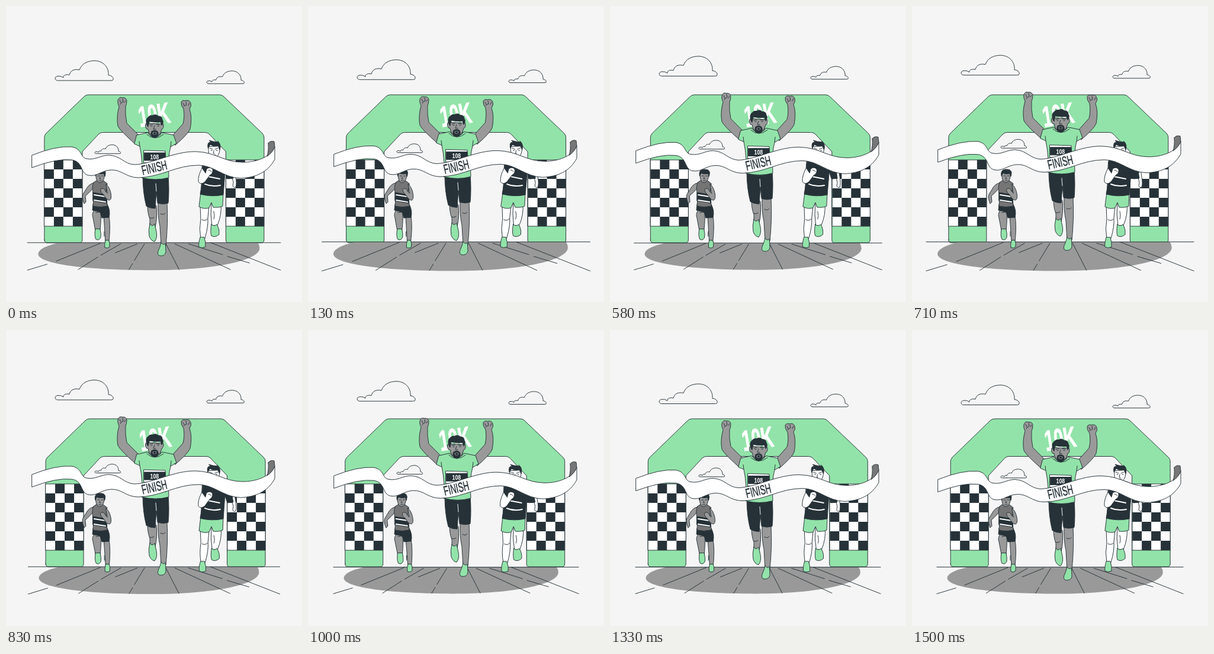
Write an HTML page that moves like this. It is 500 px wide and 500 px high and loops after 1.54 s.

```html
<!DOCTYPE html>
<html lang="en">
<head>
<meta charset="utf-8">
<title>Finish line</title>
<style>
  html, body { margin: 0; height: 100%; overflow: hidden; background: #f5f5f5; }
  svg { display: block; width: 100vw; height: 100vh; }
  svg * { vector-effect: non-scaling-stroke; }
  .ink { stroke: #263238; stroke-width: .95; stroke-linejoin: round; stroke-linecap: round; fill: none; }
  .ink .green { fill: #92e3a9; }
  .ink .dark, .dark { fill: #263238; }
  .ink .white { fill: #fff; }
  .ink .skin { fill: #999; }
  .ink .vest { fill: #757575; }
  .ink .sky { fill: #f5f5f5; }
  .stripe { stroke: #fff; stroke-width: 2; }
  text { font-family: "Liberation Sans", Arial, sans-serif; stroke: none; }
</style>
</head>
<body>
<svg viewBox="0 0 500 500">
  <defs>
    <pattern id="checks" x="65" y="260" width="32" height="32" patternUnits="userSpaceOnUse">
      <rect width="32" height="32" fill="#fff"/>
      <path class="dark" d="M16 0h16v16H0v16h16z"/>
    </pattern>
    <path id="cloud" d="M87 126C82 126 81 119 88 118.500Q93 118 97 121C96 117 102 115 107 116.500C109 109 115 106 124 108C128 97 138 92.500 150 92.500C165 93 174 104 173 117C178 117 182 121 181 124Q181 126 178 126Z"/>
  </defs>

  <g class="ink float">
    <use href="#cloud" class="sky"/>
    <use href="#cloud" class="sky" transform="translate(285.500 50) scale(.645)"/>
    <use href="#cloud" class="sky" transform="translate(113 193.300) scale(.445)"/>
  </g>

  <g id="arch" class="ink">
    <path class="green" d="M65 395V222Q65 218 68 215L132 153Q135 150 139 150H361Q365 150 368 153L433 215Q436 218 436 222V395Q436 400 431 400H376Q371.500 400 371.500 395V246L343 216Q340 213.500 336 213.500H164Q160 213.500 157 216L129 246V395Q129 400 124 400H70Q65 400 65 395Z"/>
    <path fill="url(#checks)" d="M65 260h64v112h-64z"/>
    <path fill="url(#checks)" transform="translate(307)" d="M65 260h64v112h-64z"/>
    <text transform="translate(226.500 204.500) rotate(-9) scale(.59 1)" font-size="49" font-weight="700" fill="#fff" style="stroke:#fff;stroke-width:1">10K</text>
  </g>

  <g id="ground" class="ink">
    <path fill="#999" stroke="none" d="M92 400C68 405 56 412 56 419C56 436 140 446 245 446C350 446 427 430 427 409Q427 404 424 400Z"/>
    <path d="M38 400H462M160 401L86 431M71 436L38 446M194 402L161 421M156 424L123 445M222 402L185 417M234 402L217 430M214 435L208 445M270 402L292 445M285 402L378 445M308 402L365 420M373 423L410 434M345 400L462 446"/>
  </g>

  <!-- runner on the left -->
  <g class="ink" id="left">
    <path class="skin" d="M150 344Q144 350 147 358L151 379H159Q161 360 160 346ZM165 352L168 398H174Q177 372 174 354Z"/>
    <path class="green" d="M151 377Q149 388 152 394Q157 397 160 391Q161 385 159 377ZM168 396Q166 403 167 408Q172 410 175 407Q176 400 174 396Z"/>
    <path class="dark" d="M147 335L146 345L159 348L162 358L174 357Q177 346 171 335Z"/>
    <path class="skin" d="M148 299Q140 300 135 310L130 318Q128 322 130 328L132 334L135 331L134 321Q141 315 147 308Z"/>
    <path class="vest" d="M148 298L154 294H163L171 300Q168 310 170 320L171 338Q159 341 147 338L148 320Q144 306 148 298Z"/>
    <path class="dark" d="M147 315L170 319V333L147 329Z"/>
    <path class="stripe" d="M149 319L168 322M149 328L168 331"/>
    <path class="skin" d="M169 301Q175 306 177 316Q179 326 175 328Q170 328 165 319L161 315Q158 309 162 308Q167 308 168 313L171 316Z"/>
    <path class="skin" d="M152 283Q151 292 155 297Q159 300 163 296Q167 291 166 282Z"/>
    <path class="dark" d="M151 287Q149 277 157 276Q168 275 168 282L167 288L165 283Q158 285 154 282Z"/>
    <path d="M155 287h3M161 287h3M159 289l-1 3h2M157 295h4M161 349q-5-2-9 0M166 381v8"/>
  </g>

  <!-- runner on the right -->
  <g class="ink" id="right">
    <path class="white" d="M328 335L329 360Q326 376 329 393H336Q342 373 341 358L343 338ZM347 332Q345 352 348 371H357Q365 352 363 335Z"/>
    <path class="green" d="M328 391Q325 401 326 407Q331 410 337 407Q338 399 335 391ZM347 369Q345 382 347 388Q353 392 360 386Q361 376 356 369Q352 373 347 369Z"/>
    <path class="green" d="M329 315L326 339Q335 344 343 341L347 332L350 340Q360 341 366 338L367 315Z"/>
    <path class="white" d="M381 286L384 298L383 304Q385 308 388 306Q390 300 388 289L386 276Z"/>
    <path class="dark" d="M332 262L344 255H358Q373 259 380 267L384 291L374 292L370 280L367 319Q348 323 328 318Q331 302 330 291Z"/>
    <path class="stripe" d="M341 288L361 292M336 301Q348 306 362 303"/>
    <path class="white" d="M331 274Q324 287 325 297Q329 303 336 297L344 286Q350 283 349 276Q345 271 339 275L337 282Z"/>
    <path class="white" d="M342 238Q341 250 345 255Q350 260 356 255Q362 248 361 237Z"/>
    <path class="dark" d="M341 240Q339 229 346 230L343 227L350 229L359 230L357 228Q364 233 361 243L358 236Q350 238 345 234L343 237Z"/>
    <path d="M344 240l5 2M353 242l5-2M346 244h2M355 244h2M351 244l-1 5h2M348 252q3-1 6 0M342 277q3 0 5 3M331 361q5 3 9-1M351 347q2 8 0 13"/>
  </g>

  <!-- winner and ribbon -->
  <g class="ink float">
    <path class="skin" d="M239 335Q239 350 243 360L243 374H252Q256 357 254 338ZM257 330Q256 354 260 372L262 405H270Q274 368 272 331Z"/>
    <path d="M243 358q4 2 7-1M261 351q5 3 8-1"/>
    <path class="green" d="M243 368Q240 379 242 389Q245 397 251 398Q256 392 254 381L251 368Q247 374 243 368ZM262 400Q260 408 257 414Q255 421 260 422Q268 423 270 416Q270 408 269 401Q266 405 262 400Z"/>
    <path class="dark" d="M231 286H274Q276 312 274 333Q266 336 256 333L254 313L252 342Q243 342 237 338Q231 315 231 286Z"/>
    <path d="M253 300L254 313" stroke="#fff"/>
    <path class="skin" d="M218 233Q193 211 189 203Q186 188 191 170Q187 162 190 157Q192 153 196 155Q203 154 204 160Q204 166 202 170Q201 184 204 198L224 218ZM286 235Q307 217 311 208Q315 188 310 174Q314 168 312 164Q310 158 303 160Q299 158 296 162Q295 168 300 174Q302 188 299 199L282 218Z"/>
    <path d="M192 159l2 4M197 157l1 5q-4 1-5 4M202 160l-2 3M299 164l2 4M304 162l1 5q-4 1-5 3M310 164l-2 4"/>
    <path class="green" d="M221 218L239 214Q251 226 264 214L283 218L288 232L278 238Q273 255 275 290Q253 296 229 290Q232 265 226 237L217 233Z"/>
    <path d="M226 237l-1-8M278 238l1-9M238 217Q251 229 266 217M264 281h6"/>
    <path class="white" d="M233 244L269 245L270 265L233 265Z"/>
    <path class="dark" d="M234 248H269V261H234Z"/>
    <text transform="translate(243.500 259) scale(.8 1)" font-size="11" font-weight="700" fill="#fff">108</text>

    <path class="skin" d="M242 212V217Q251 226 261 217V211Z"/>
    <path class="skin" d="M238 198Q234 198 236 205Q237 209 240 208Q242 222 251 222Q260 222 263 208Q266 208 266 202Q266 197 263 199Z"/>
    <path class="dark" d="M238 201Q235 191 240 188Q243 184 248 185Q253 182 257 186Q264 186 264 192Q267 196 263 202L261 196Q251 197 242 195L240 204Z"/>
    <path class="dark" d="M246 212Q251 208 256 212Q259 218 255 221Q251 224 247 221Q243 218 246 212Z"/>
    <path class="skin" d="M247 214Q251 210 255 214Q255 218 251 218Q247 218 247 214Z"/>
    <path class="dark" stroke="none" d="M248.500 214.500Q251 212 253.500 214.500Q253 217 251 217Q249 217 248.500 214.500Z"/>
    <path d="M243 201l5-1M254 200l5 1M245 203h2M256 203h2M251 202l-2 6h4"/>

    <path class="white" d="M44 252Q84 236 111 238C129 241 125 256 136 258C151 261 160 252 174 252C194 253 199 267 217 268C248 267 284 245 321 246C355 247 368 264 400 264C422 264 446 256 454 238V259C442 281 422 290 396 291C367 290 351 269 325 269C287 269 263 289 224 290C202 290 196 276 177 277C161 278 153 289 139 286C125 283 131 263 111 260Q86 257 44 273Z"/>
    <path fill="#777" d="M443 232Q446 227 453 229L454 238Q450 248 441 254Q444 245 443 232Z"/>
    <text class="dark" transform="translate(231 285.500) rotate(-13) scale(.59 1)" font-size="22.500" style="stroke:#263238;stroke-width:.4">FINISH</text>
  </g>
</svg>
<script>
const LOOP = 1540, FRAMES = 37, LEAD = 50;

// keyframes: [percent of the loop, value], linear in between
const floating = [[0, 0], [50, -10], [100, 0]];
const wind = [[0, 0], [25, 1], [75, -1], [100, 0]];
const shake = [[0, 0], [10, -1], [20, 2], [30, -4], [40, 4], [50, -4], [60, 4], [70, -4], [80, 2], [90, -1], [100, 0]];
const heartbeat = [[0, 1], [10, 1.1], [30, 1], [40, 1], [50, 1.1], [60, 1], [100, 1]];

function valueAt(keys, percent) {
  const i = keys.findIndex(key => key[0] > percent);
  const [p0, a] = keys[i - 1], [p1, b] = keys[i];
  return a + (b - a) * (percent - p0) / (p1 - p0);
}

const move = (selector, value) =>
  document.querySelectorAll(selector).forEach(el => el.setAttribute("transform", value));

function draw(now) {
  // the picture advances at 24 steps per second
  const step = Math.floor((now % LOOP + 5) / LOOP * FRAMES);
  const percent = (step / FRAMES + LEAD / LOOP) % 1 * 100;
  const sway = valueAt(wind, percent);
  move(".float", `translate(0 ${valueAt(floating, percent) + .6})`);
  move("#arch", `translate(${valueAt(shake, percent) + .2})`);
  move("#ground", `translate(250 423) scale(${valueAt(heartbeat, percent) / 1.024}) translate(-250 -423)`);
  move("#left", `rotate(${sway} 153 343)`);
  move("#right", `rotate(${sway} 357 319)`);
  requestAnimationFrame(draw);
}
requestAnimationFrame(draw);
</script>
</body>
</html>
```
